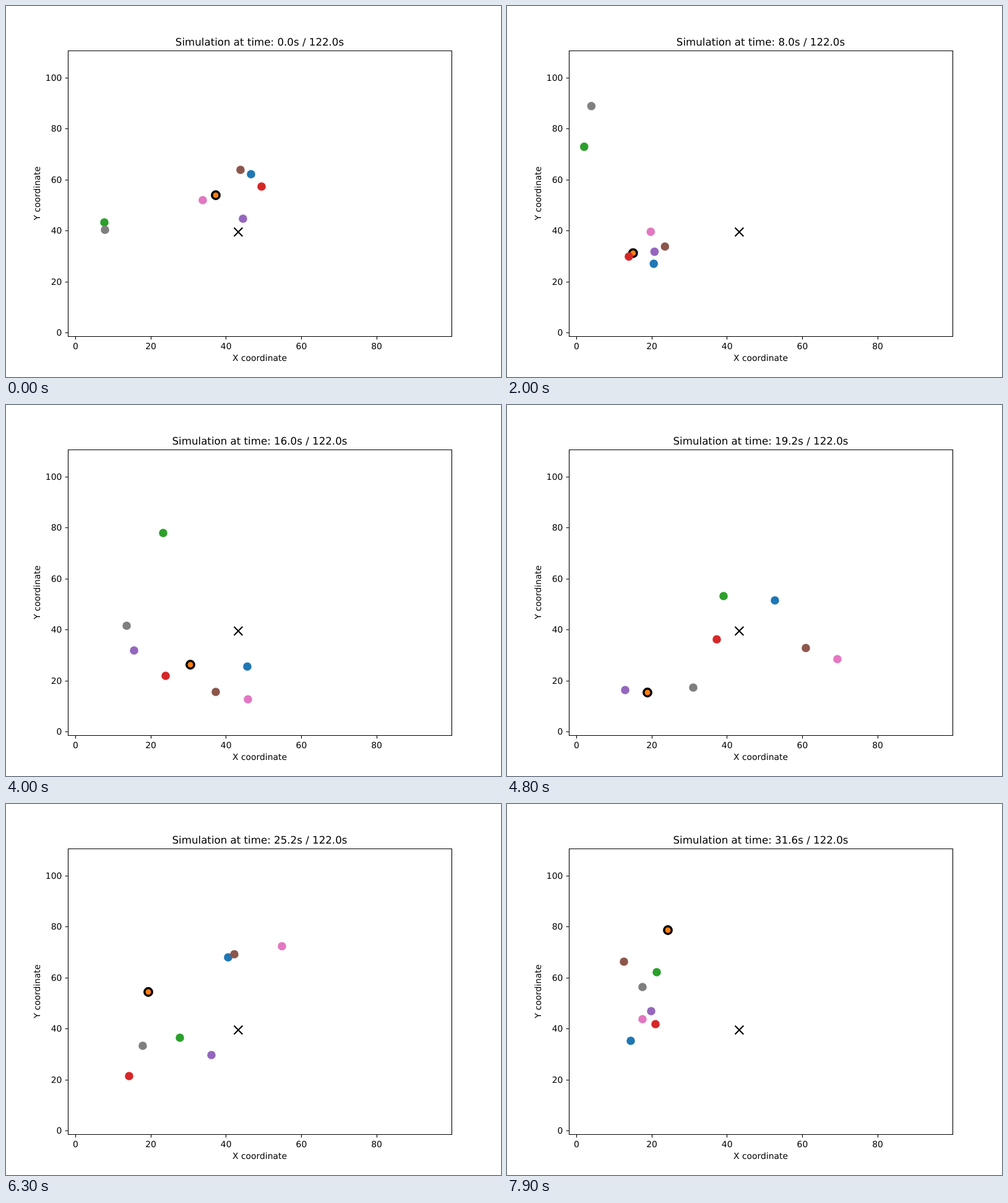
Animation of 800 by 600 pixels, one loop 8 s. Source, as an HTML page:

```html
<!DOCTYPE html>
<html lang="en">
<head>
<meta charset="utf-8">
<title>Simulation</title>
<style>
  html, body { margin: 0; height: 100%; overflow: hidden; background: #fff; }
  svg { display: block; }
  text { font: 13.89px "DejaVu Sans", sans-serif; text-anchor: middle; text-rendering: geometricPrecision; }
  #title { font-size: 16.67px; }
  #axes { fill: none; stroke: #000; stroke-width: 1.11; }
  .y { text-anchor: end; }
</style>
</head>
<body>
<svg width="800" height="600" viewBox="0 0 800 600">
  <path id="axes"/>
  <g id="labels"></g>
  <text x="410" y="574">X coordinate</text>
  <text transform="translate(55 303) rotate(-90)">Y coordinate</text>
  <text id="title" x="410" y="64"></text>
  <path d="M368.5 358.6l13.8 13.8m0-13.8l-13.8 13.8" stroke="#000" stroke-width="2.08"/>
  <g id="dots"></g>
</svg>
<script>
const $ = id => document.getElementById(id);
const STEP = 100, STEPS = 80;
const TIMES = [0, 13, 28, 40, 48, 63, 79];

// Key points of each path, reached at TIMES (in steps)
const dots = [
  ['#1f77b4', '396,272 276,348 232,479 390,423 433,316 359,248 200,383'],
  ['#ff7f0e', '339,306 230,360 203,436 298,420 227,465 230,304 260,204'],
  ['#2ca02c', '159,350 126,286 144,173 254,207 350,309 281,378 242,272'],
  ['#d62728', '413,292 258,338 162,473 258,438 339,379 199,440 240,356'],
  ['#9467bd', '383,344 282,444 203,335 207,397 191,461 332,406 233,335'],
  ['#8c564b', '379,265 327,341 198,438 339,464 483,393 369,243 189,255'],
  ['#e377c2', '318,314 305,315 178,431 391,476 534,411 446,230 219,348'],
  ['#7f7f7f', '160,362 143,196 139,173 195,357 301,457 221,391 219,296']
].map(([color, path], i) => ({
  keys: path.split(' ').map(p => p.split(',').map(Number)),
  el: add($('dots'), 'circle', i === 1
    ? { r: 6.2, fill: color, stroke: '#000', 'stroke-width': 3.5 }
    : { r: 6.8, fill: color })
}));

function add(parent, tag, attrs, text = '') {
  const el = document.createElementNS('http://www.w3.org/2000/svg', tag);
  for (const k in attrs) el.setAttribute(k, attrs[k]);
  el.textContent = text;
  return parent.appendChild(el);
}

// Axes and tick labels
let frame = 'M100.5 72.5H720.5V534.5H100.5Z';
for (let i = 0; i < 6; i++) {
  const x = 112.3 + 121.7 * i, y = Math.floor(528.6 - 82.5 * i);
  if (i < 5) {
    frame += `M${Math.floor(x) + 0.5} 534.5v4.9`;
    add($('labels'), 'text', { x, y: 555 }, i * 20);
  }
  frame += `M100.5 ${y + 0.5}h-4.9`;
  add($('labels'), 'text', { x: 90.3, y: y + 5, class: 'y' }, i * 20);
}
$('axes').setAttribute('d', frame);

// Smooth curve through the key points; axis 0 is x, 1 is y
function place(keys, step, axis) {
  const last = TIMES.length - 1;
  const i = Math.min(TIMES.findLastIndex(t => t <= step), last - 1);
  const slope = j => {
    const a = Math.max(j - 1, 0), b = Math.min(j + 1, last);
    return (keys[b][axis] - keys[a][axis]) / (TIMES[b] - TIMES[a]);
  };
  const h = TIMES[i + 1] - TIMES[i], u = (step - TIMES[i]) / h, w = 1 - u;
  return keys[i][axis] * w * w * (1 + 2 * u) + keys[i + 1][axis] * u * u * (1 + 2 * w)
    + h * u * w * (w * slope(i) - u * slope(i + 1));
}

function draw() {
  const step = Math.floor(performance.now() / STEP) % STEPS;
  $('title').textContent = `Simulation at time: ${(step * 0.4).toFixed(1)}s / 122.0s`;
  for (const { keys, el } of dots) {
    el.setAttribute('cx', place(keys, step, 0));
    el.setAttribute('cy', place(keys, step, 1));
  }
  requestAnimationFrame(draw);
}
draw();
</script>
</body>
</html>
```
